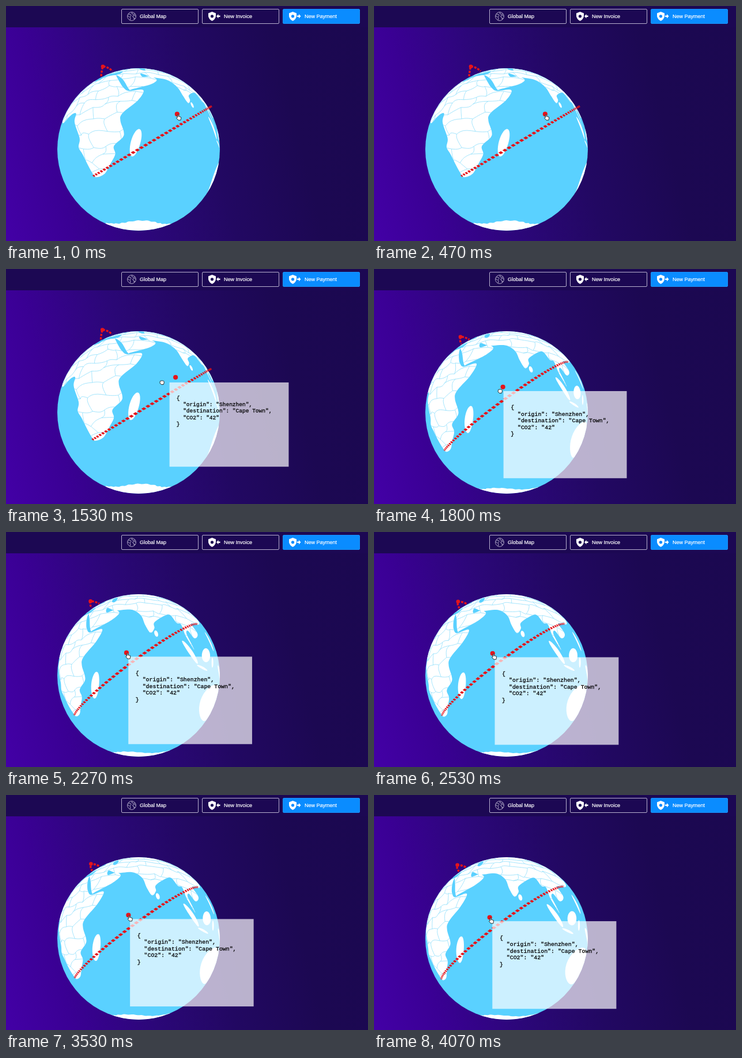
Write an HTML page with a canvas that moves like this. It is 628x408 px and loops after 4.13 s.

```html
<!DOCTYPE html>
<html lang="en">
<head>
<meta charset="utf-8">
<title>Shipping globe</title>
<style>
html, body { margin: 0; width: 100%; height: 100%; overflow: hidden; }
body {
  position: relative;
  background: linear-gradient(76deg, #4300a6 0%, #3a0094 16%, #2b0778 36%, #220862 55%, #1c0852 76%, #1b0850 100%);
  font: 9px "Liberation Sans", Arial, sans-serif;
}
header { position: absolute; inset: 0 0 auto; height: 37px; background: #1c0853; }
.btn {
  position: absolute; top: 5px; width: 134px; height: 26px; box-sizing: border-box;
  border: 1px solid #b9b2cf; border-radius: 2px; color: #fff; -webkit-text-stroke: .2px #fff;
}
.btn span { position: absolute; left: 31px; line-height: 24px; white-space: nowrap; }
.btn .wide { left: 37px; }
.btn svg { position: absolute; left: 8px; top: 3px; }
.pay { background: #0a8cff; border-color: #1b90fb; }
canvas, .panel, .hand { position: absolute; left: 0; top: 0; }
.panel {
  width: 205px; height: 145px; margin: 0; box-sizing: border-box; padding: 23px 0 0 12px;
  background: rgba(255, 255, 255, .69); color: #000; transform-origin: 0 0;
  font: 9.45px/10.9px "Liberation Mono", "Courier New", monospace; -webkit-text-stroke: .25px #000;
}
.hand { overflow: visible; }
</style>
</head>
<body>
<header>
  <div class="btn" style="left:200px">
    <svg width="18" height="18" fill="none" stroke="#cfc9df" stroke-width=".8">
      <circle cx="9" cy="9" r="7.4"/>
      <path d="M3 5l4 .5 1 2-2 2.5 1 3-1 2.5M2 8l3 2M10 2l-1 2 3 1.500 3-.5M11 8l3-1 2 2M11 8l0 2 2 1 0 3 2-2"/>
    </svg><span>Global Map</span>
  </div>
  <div class="btn" style="left:340px">
    <svg width="26" height="18" fill="#fff">
      <path d="M8.500 1L15 3.500v5.500q-1 5-6.500 8Q3 14 2 9V3.500Z"/><circle cx="8.500" cy="8.800" r="2.600" fill="#1c0853"/>
      <path d="M16 8.800l3.500-3.800v2.500h3v2.600h-3v2.500Z"/>
    </svg><span class="wide">New Invoice</span>
  </div>
  <div class="btn pay" style="left:480px">
    <svg width="26" height="18" fill="#fff">
      <path d="M8.500 1L15 3.500v5.500q-1 5-6.500 8Q3 14 2 9V3.500Z"/><circle cx="8.500" cy="8.800" r="2.600" fill="#0a8cff"/>
      <path d="M22.500 8.800l-3.500-3.800v2.500h-3v2.600h3v2.500Z"/>
    </svg><span class="wide">New Payment</span>
  </div>
</header>
<canvas id="globe" width="628" height="408"></canvas>
<pre class="panel" id="panel">{
  "origin": "Shenzhen",
  "destination": "Cape Town",
  "CO2": "42"
}</pre>
<svg class="hand" id="hand" width="10" height="11" fill="#fff" stroke="#111" stroke-width=".9" stroke-linejoin="round">
  <path id="point" d="M2.500 6V1.200q.9-1.200 1.800 0V4.200q1-.7 1.500.2 1-.5 1.500.4 1-.3 1.400.6V8L8 10.500H4L.8 6.800q.2-1.300 1.700-.8Z"/>
  <path id="grab" d="M1.500 6V4.500q.6-1.500 1.800-.8.700-1 1.600-.1.900-.7 1.600.2 1.400-.4 1.800 1V7.500L7.300 10H3.500L1 7.300Z"/>
</svg>
<script>
const LOOP = 4130, CX = 230, CY = 249, RADIUS = 141;
const DIST = 3, LIMB = Math.sqrt(DIST * DIST - 1);
const RED = '#e5141b', SEA = '#5ad1ff';
const ctx = document.getElementById('globe').getContext('2d');
const [panel, hand, point, grab] = ['panel', 'hand', 'point', 'grab'].map(id => document.getElementById(id));

const rad = d => d * Math.PI / 180;
const mix = (a, b, u) => a + (b - a) * u;
const smooth = u => u * u * (3 - 2 * u);
const dot3 = (a, b) => a[0] * b[0] + a[1] * b[1] + a[2] * b[2];
const range = n => [...Array(n).keys()];

function vec(lon, lat) {
  const c = Math.cos(rad(lat));
  return [c * Math.cos(rad(lon)), c * Math.sin(rad(lon)), Math.sin(rad(lat))];
}

// Closed Catmull-Rom curve through longitude, latitude pairs
function coast(list) {
  const n = list.length / 2, steps = 8;
  const key = (i, axis) => list[2 * ((i + n) % n) + axis];
  return range(n * steps).map(k => {
    const i = Math.floor(k / steps), u = k % steps / steps;
    const curve = axis => {
      const [a, b, c, d] = [-1, 0, 1, 2].map(o => key(i + o, axis));
      return b + u * (c - a + u * (2 * a - 5 * b + 4 * c - d + u * (3 * b - 3 * c + d - a))) / 2;
    };
    return vec(curve(0), curve(1));
  });
}

function oval(lon, lat, long, short, tilt) {
  const c = Math.cos(rad(tilt)), s = Math.sin(rad(tilt));
  return range(36).map(i => {
    const x = long * Math.cos(rad(i * 10)), y = short * Math.sin(rad(i * 10));
    return vec(lon + x * c - y * s, lat + x * s + y * c);
  });
}

const africa = coast([-6,36, 10,37, 11,34, 19,30.5, 22,33, 32,31, 33,29, 37,20, 39.5,15, 43,11.5, 51,12, 48,4.5,
  40,-3, 39,-7, 40.7,-13, 40,-16, 35,-20, 35.4,-24, 32.5,-28, 27,-33.5, 20,-34.8, 18,-32, 14.5,-22, 12,-17,
  13.5,-12, 9,-1, 9.5,4, 5,5.5, -7,4.5, -17,14, -16.5,21, -10,31]);
const eurasia = coast([32.6,31, 35,32, 36,36.5, 28,36.5, 26.5,40, 35,42, 41.5,41.5, 37,45.5, 30,46, 28,42, 22.5,37,
  13,45, 16,38, 10,44, -2,37, -9,43, 5,52, 25,71, 60,69, 105,77, 170,70, 140,54, 128,40, 129,35.5, 125,39, 119,38,
  121.5,30, 117,23.5, 110,21, 106,19.5, 109,13, 105,9, 101,13, 99.5,10, 103.5,1.5, 98.5,9, 97,16.5, 94,17, 91,22.5,
  87,21, 80.3,15, 80,11, 77.7,8, 75,13, 72.7,20, 67,25, 57,25.5, 50,30, 51,25, 56.3,26, 59.8,22.5, 55,17, 45,12.8,
  43,13, 39,22, 35,28]);
const antarctica = range(120).map(i => vec(i * 3, -69 + 1.5 * Math.cos(rad(4 * (i * 3 - 54))) + .4 * Math.sin(i * 1.3)));
const madagascar = oval(46.8, -18.8, 7.2, 2.5, 73), sriLanka = oval(80.8, 7.7, 1.9, 1, 100);
const sumatra = oval(100.7, -.3, 7.6, 1.5, -48), java = oval(110, -7.5, 4.8, .7, -8);
const borneo = oval(114, .8, 5.3, 3.6, 45), sulawesi = oval(121, -2, 3.3, 1.2, 80);
const newGuinea = oval(140, -5.5, 10, 3, -22), philippines = oval(123, 12.5, 6.5, 1.5, -65);
const australia = oval(134, -25.5, 20.5, 12, 0), caspian = oval(51.5, 41.5, 5.3, 2.2, 105);
const mainland = [africa, eurasia];
const islands = [antarctica, madagascar, sriLanka, sumatra, java, borneo, sulawesi, newGuinea, philippines, australia];

// Country borders: a jittered brick lattice, later clipped to the mainland
const noise = n => { const s = Math.sin(n * 12.9898) * 43758.5453; return s - Math.floor(s) - .5; };
const node = (i, j) => [-18 + 8 * i + 5 * noise(i * 31 + j * 7), -32 + 7 * j + 4 * noise(i * 17 + j * 43 + 5)];
function border(a, b, seed) {
  const bend = 3 * noise(seed);
  return range(7).map(k => {
    const u = k / 6, bow = bend * Math.sin(u * Math.PI);
    return vec(mix(a[0], b[0], u) + bow, mix(a[1], b[1], u) - bow);
  });
}
const borders = [];
for (let i = 0; i < 17; i++) {
  for (let j = 0; j < 12; j++) {
    borders.push(border(node(i, j), node(i + 1, j), i + j * 20));
    if ((i + j) % 2) borders.push(border(node(i, j), node(i, j + 1), i * 20 + j));
  }
}

let east, north, front;
function aim(lon, lat) {
  front = vec(lon, lat);
  north = vec(lon, lat + 90);
  east = vec(lon + 90, 0);
}

function project(v, r = 1) {
  const z = dot3(v, front) * r, s = LIMB * r / (DIST - z);
  const x = dot3(v, east) * s, y = dot3(v, north) * s;
  const behind = z < 1 / DIST;
  return { x: CX + x * RADIUS, y: CY - y * RADIUS, s, behind, hidden: behind && Math.hypot(x, y) < 1 };
}

// Points past the horizon are pushed just outside the disc
function landPoint(v) {
  const p = project(v);
  if (!p.behind) return p;
  const x = p.x - CX, y = p.y - CY, k = 1.03 * RADIUS / (Math.hypot(x, y) || 1);
  return { x: CX + x * k, y: CY + y * k };
}

function addShape(path) {
  path.map(landPoint).forEach((p, i) => i ? ctx.lineTo(p.x, p.y) : ctx.moveTo(p.x, p.y));
  ctx.closePath();
}

function fillShapes(shapes, color) {
  ctx.beginPath();
  shapes.forEach(addShape);
  ctx.fillStyle = color;
  ctx.fill();
}

function disc(x, y, r, color) {
  ctx.beginPath();
  ctx.arc(x, y, r, 0, 7);
  ctx.fillStyle = color;
  ctx.fill();
}

function drawGlobe() {
  ctx.save();
  disc(CX, CY, RADIUS, SEA);
  ctx.clip();
  islands.forEach(shape => fillShapes([shape], '#fff'));
  fillShapes(mainland, '#fff');
  ctx.clip();
  ctx.beginPath();
  for (const line of borders) {
    const pts = line.map(v => project(v));
    if (pts.some(p => p.behind)) continue;
    pts.forEach((p, i) => i ? ctx.lineTo(p.x, p.y) : ctx.moveTo(p.x, p.y));
  }
  ctx.strokeStyle = '#8fdffc';
  ctx.lineWidth = .8;
  ctx.stroke();
  fillShapes([caspian], SEA);
  ctx.restore();
}

const capeTown = vec(18, -34), shenzhen = vec(114, 22.5), marker = vec(66.2, -4.9);
const span = Math.acos(dot3(capeTown, shenzhen));

function routePoint(t) {
  const a = Math.sin((1 - t) * span) / Math.sin(span), b = Math.sin(t * span) / Math.sin(span);
  return project(capeTown.map((c, i) => c * a + shenzhen[i] * b), 1 + .4 * t * (1 - t));
}

function drawRoute(shift) {
  const count = 50;
  ctx.fillStyle = RED;
  for (let i = -1; i < count; i++) {
    const t0 = Math.max(0, (i + shift) / count), t1 = Math.min(1, (i + shift + .62) / count);
    if (t1 <= t0) continue;
    const a = routePoint(t0), b = routePoint(t1);
    if (a.hidden || b.hidden) continue;
    const dx = b.x - a.x, dy = b.y - a.y, len = Math.hypot(dx, dy) || 1;
    const w = 1.4 * a.s, nx = dy / len * w, ny = -dx / len * w;
    const sx = dx * .22, sy = dy * .22;
    ctx.beginPath();
    ctx.moveTo(a.x + nx - sx, a.y + ny - sy);
    ctx.lineTo(b.x + nx - sx, b.y + ny - sy);
    ctx.lineTo(b.x - nx + sx, b.y - ny + sy);
    ctx.lineTo(a.x - nx + sx, a.y - ny + sy);
    ctx.fill();
  }
}

// Short route peeking over the horizon
function drawFarRoute(u, shift) {
  const x = mix(168, 144, u), y = mix(105, 122, u);
  ctx.strokeStyle = RED;
  ctx.lineWidth = 3.4;
  ctx.setLineDash([4, 2]);
  ctx.lineDashOffset = -6 * shift;
  ctx.beginPath();
  ctx.moveTo(mix(165, 147, u), mix(122, 133, u));
  ctx.quadraticCurveTo(x - 2, y + 6, x, y);
  ctx.quadraticCurveTo(x + 8, y, mix(185, 159, u), mix(113, 126, u));
  ctx.stroke();
  ctx.setLineDash([]);
  disc(x, y, 3.3, RED);
}

// Eased stops of the globe's turn: time, longitude
const LON0 = 48.4, LON1 = 74.3;
const stops = [[1400, LON0], [1530, 49.2], [1800, 67.8], [2270, 71.5], [3000, LON1], [3600, 70.5], [4070, 73.6]];

function longitude(t) {
  const i = stops.findIndex(s => s[0] > t);
  if (i === 0) return LON0;
  if (i < 0) return stops[stops.length - 1][1];
  const [t0, a] = stops[i - 1], [t1, b] = stops[i];
  return mix(a, b, smooth((t - t0) / (t1 - t0)));
}

function draw(now) {
  const t = now % LOOP, lon = longitude(t), u = (lon - LON0) / (LON1 - LON0);
  const shift = t / LOOP * 8 % 1;
  aim(lon, mix(-22.2, -14, u));
  ctx.clearRect(0, 0, 628, 408);
  drawGlobe();
  drawFarRoute(u, shift);
  drawRoute(shift);
  const m = project(marker, 1.1);
  disc(m.x, m.y, 4.1, RED);

  panel.style.visibility = t < 700 ? 'hidden' : 'visible';
  panel.style.transform =
    `translate(${m.x + mix(-11, 5, u)}px, ${m.y + mix(9, 6.5, u)}px) scale(${1 + .05 * Math.sqrt(u)})`;

  // The hand runs ahead of the marker while it drags
  const lead = Math.exp(-(((t - 1600) / 170) ** 2));
  const grabbing = t > 1300 && t < 2200;
  grab.style.display = grabbing ? '' : 'none';
  point.style.display = grabbing ? 'none' : '';
  hand.style.transform = `translate(${m.x - 2 - 31 * lead}px, ${m.y + 3 * lead}px)`;
}

const start = performance.now();
function tick() {
  draw(performance.now() - start);
  requestAnimationFrame(tick);
}
tick();
</script>
</body>
</html>
```
